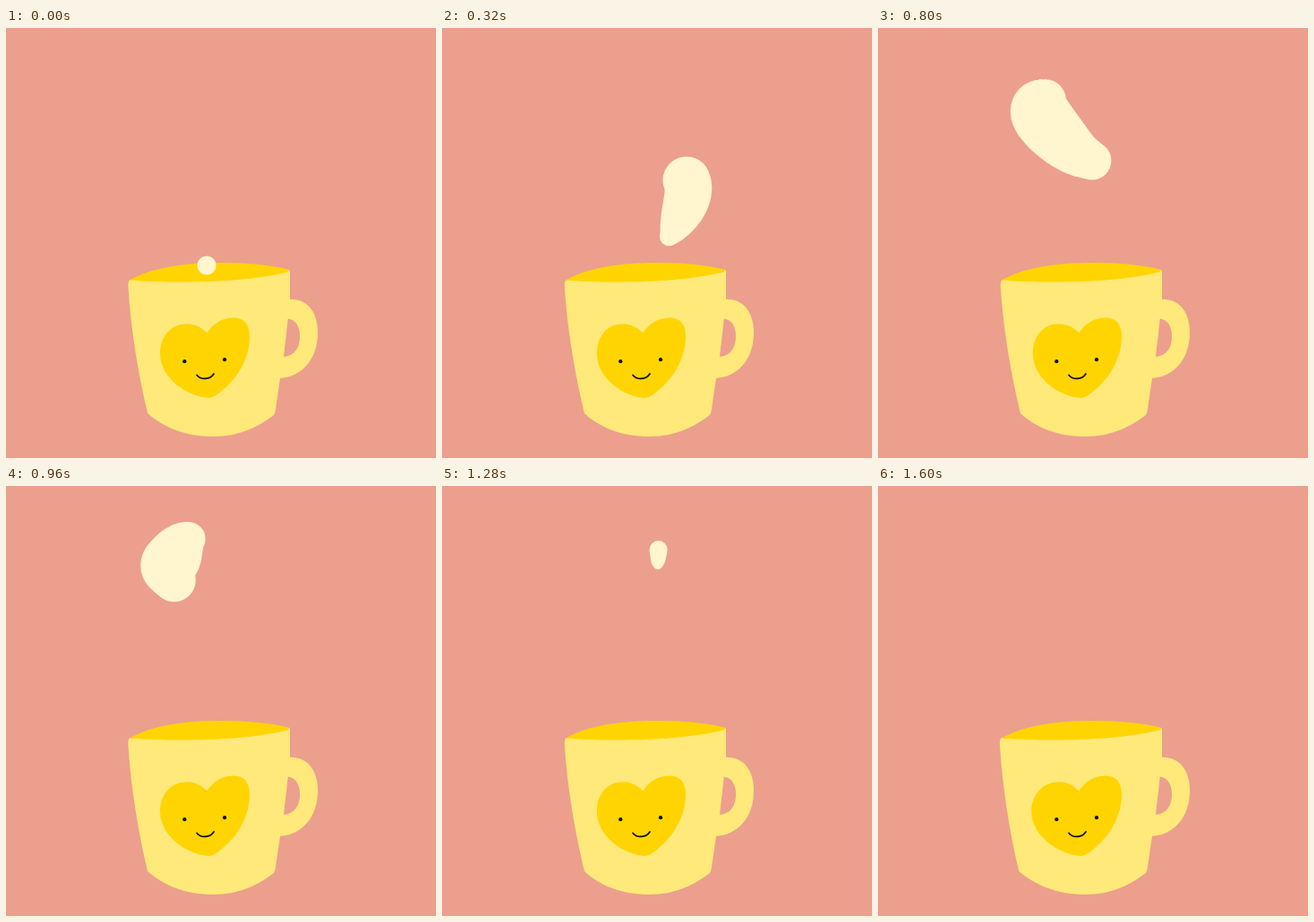
Write an HTML page with a canvas that moves like this. It is 480 by 480 pixels and loops after 1680 ms.

```html
<!DOCTYPE html>
<html lang="en">
<head>
<meta charset="utf-8">
<title>Steaming mug</title>
<style>
html, body { margin: 0; width: 100%; height: 100%; overflow: hidden; background: #ec9f8d; }
canvas { display: block; width: 480px; height: 480px; }
</style>
</head>
<body>
<canvas id="stage" width="480" height="480"></canvas>
<script>
const ctx = document.getElementById('stage').getContext('2d');
const STEP = 80, STEPS = 21;
const PINK = '#ec9f8d', CREAM = '#fff5ce', LEMON = '#ffe97a', YELLOW = '#ffd400';

// The trail the steam climbs; its head passes one point every two steps.
const trail = [
  [224, 265], [259, 224], [273, 170], [219, 137], [182, 97],
  [187, 80], [204, 59], [238, 55], [241, 88]
];

const mix = (a, b, t) => a + (b - a) * t;

// Catmull-Rom position on the trail at a given step.
function trailAt(step) {
  const u = step / 2, last = trail.length - 1;
  const i = Math.min(Math.max(Math.floor(u), 0), last - 1), t = u - i;
  const point = k => trail[Math.min(Math.max(k, 0), last)];
  return [0, 1].map(axis => {
    const [a, b, c, d] = [i - 1, i, i + 1, i + 2].map(k => point(k)[axis]);
    return b + t / 2 * (c - a + t * (2 * a - 5 * b + 4 * c - d + t * (3 * (b - c) + d - a)));
  });
}

// A blob swells, stretches behind its head, then shrinks; its bulk shifts to the tail.
function drawSteam(step) {
  const swell = 1 - ((step - 8) / 8.4) ** 2;
  if (swell <= 0) return;
  const size = 33 * Math.sqrt(swell);
  const lag = 0.6 * step * (1 - (step / 16.6) ** 3);
  const head = 1.05 - 0.034 * step;
  const tail = Math.min(1, 0.3 + 0.0037 * step * step);
  const bulge = 0.075 * lag;

  ctx.fillStyle = CREAM;
  ctx.beginPath();
  for (let n = 0; n <= 100; n++) {
    const v = n / 100;
    const [x, y] = trailAt(step - lag * (1 - v));
    const r = size * (mix(tail, head, v) + bulge * Math.sin(Math.PI * v));
    ctx.moveTo(x + r, y);
    ctx.arc(x, y, r, 0, Math.PI * 2);
  }
  ctx.fill();
}

function shape(color, path) {
  ctx.fillStyle = color;
  ctx.fill(new Path2D(path));
}

function dot(x, y, r) {
  ctx.beginPath();
  ctx.arc(x, y, r, 0, Math.PI * 2);
  ctx.fill();
}

function drawMug(step) {
  // The hand-drawn outline wobbles through three variants.
  const sway = Math.sin(step % 3 * 2);
  const left = 136.3 + sway / 2, foot = 158 + sway, heart = 172 + sway;

  // Handle
  shape(LEMON, 'M314 303C336 301 348 317 348 340C348 369 331 390 304 391Z');
  shape(PINK, 'M314 324.5C323 325 328 333 328 344C328 357 322 366 310 367Z');

  // Body and drink
  shape(LEMON, `M${left + 2} 281Q${left} 282 ${left} 288
    C${left + 3} 337 ${foot - 10} 388 ${foot} 430
    C176 446 200 456 232 456C262 456 283 444 299 432Q300.5 430 301 425
    L306 391Q313 347 317 304V271Q316 269 313 270Z`);
  shape(YELLOW, 'M138 281.5C163 267 202 262 241 262C271 262 298 265 315 269.5Q316.5 270.5 314 272.5C273 283 200 286 138 281.5Z');

  // Heart
  shape(YELLOW, `M224.5 340.5C215 331 207 330 200 330.5
    C183 331 ${heart} 346 ${heart} 363C${heart} 392 204 412 227 413
    Q231 412.5 235 409.5C260 392 272 367 272 344C272 329 264 323 253 323.5
    C240 324 230 331 224.5 340.5Z`);

  // Face
  ctx.fillStyle = ctx.strokeStyle = '#0d0a00';
  dot(199.3, 372.2, 2.1);
  dot(244, 370.2, 2.1);
  ctx.lineWidth = 1.7;
  ctx.lineCap = 'round';
  ctx.stroke(new Path2D('M213 387.5C217.5 393 227.5 393 232 386'));
}

function render(now) {
  const step = Math.floor(now / STEP) % STEPS;
  ctx.fillStyle = PINK;
  ctx.fillRect(0, 0, 480, 480);
  drawMug(step);
  drawSteam(step);
}

let start;
function tick(now) {
  start ??= now;
  render(Math.max(now - start, 0));
  requestAnimationFrame(tick);
}
render(0);
requestAnimationFrame(tick);
</script>
</body>
</html>
```
